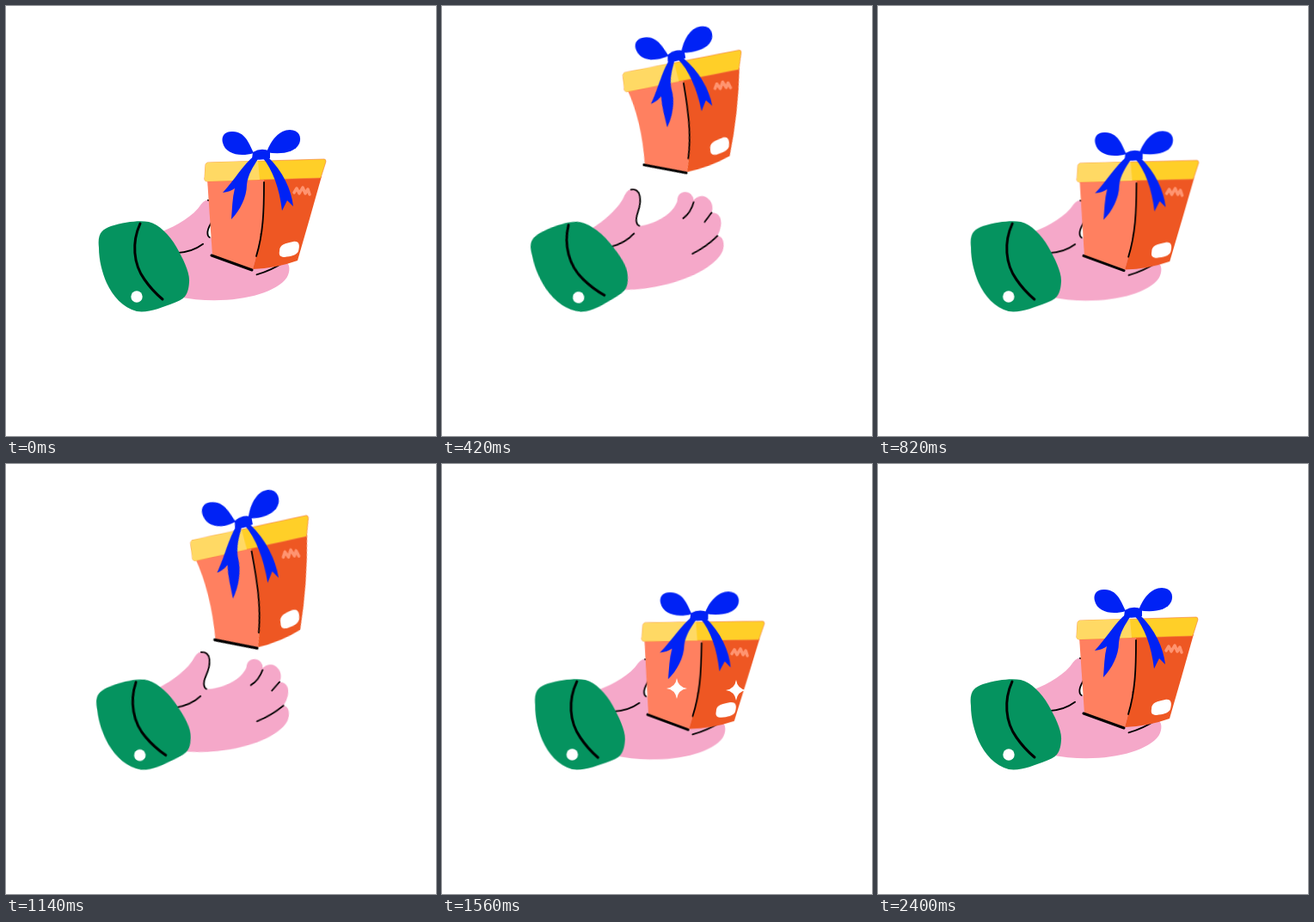
An HTML page without scripts that plays this animation: 500 px wide and 500 px high, repeating every 2420 ms.

```html
<!DOCTYPE html>
<html lang="en">
<head>
<meta charset="utf-8">
<title>Gift toss</title>
<style>
  html, body { margin: 0; width: 100%; height: 100%; overflow: hidden; background: #fff; }
  svg { display: block; width: 100%; height: 100%; }

  .arm, .box, .tail, .face, .spark {
    animation: 2420ms cubic-bezier(.33, 0, .67, 1) infinite;
  }
  .arm { transform-origin: 160px 302px; animation-name: swing; }
  .box, .tail { transform-origin: 295px 173px; }
  .box { animation-name: toss; }
  .tail { animation-name: sway; }
  .tail.left { --sway: -8deg; }
  .tail.right { --sway: 5deg; }
  .face.left { animation-name: bend-left; }
  .face.right { animation-name: bend-right; }

  .line { fill: none; stroke: #000; stroke-width: 1.8; stroke-linecap: round; }
  .thick { stroke-width: 3; }
  .skin { fill: #f5a8c9; }
  .ribbon { fill: #0022f5; }

  /* Two equal 800 ms tosses, then a rest */
  @keyframes swing {
    0%, 33.06%, 66.12%, 100% { transform: rotate(0deg); }
    9.09%, 23.97%, 42.15%, 57.02% { transform: rotate(11deg); }
    16.53%, 49.59% { transform: rotate(-11.4deg); }
  }
  @keyframes toss {
    0%, 33.06%, 66.12%, 100% { transform: translate(0, 0) rotate(0deg) scale(1, 1); }
    9.09%, 42.15% {
      transform: translate(28px, 42px) rotate(11deg) scale(1.1, .88);
      animation-timing-function: cubic-bezier(.4, .1, .7, .9);
    }
    14.05%, 47.11% {
      transform: translate(-20.5px, -104px) rotate(-10.5deg) scale(1, 1.1);
      animation-timing-function: cubic-bezier(.2, .5, .6, 1);
    }
    15.7%, 48.76% {
      transform: translate(-24px, -122px) rotate(-10deg) scale(1, 1.05);
      animation-timing-function: cubic-bezier(.4, 0, .7, .6);
    }
    17.36%, 50.41% {
      transform: translate(-24.5px, -115px) rotate(-9.5deg) scale(1, 1.015);
      animation-timing-function: cubic-bezier(.35, .2, .7, .9);
    }
    23.97%, 57.02% { transform: translate(28px, 42px) rotate(11deg) scale(1.1, .88); }
  }
  @keyframes sway {
    0%, 9.09%, 23.97%, 42.15%, 57.02%, 100% { transform: rotate(0deg); }
    14.05%, 47.11% { transform: rotate(calc(var(--sway) + 3deg)); }
    17.36%, 50.41% { transform: rotate(var(--sway)); }
  }
  @keyframes bend-left {
    0%, 9.09%, 23.97%, 42.15%, 57.02%, 100% { d: path("M234 201Q237 247 240 290L287 306Q300 262 300 200Z"); }
    14.05%, 17.36%, 47.11%, 50.41% { d: path("M234 201Q245 240 240 290L287 306Q302 262 300 200Z"); }
  }
  @keyframes bend-right {
    0%, 9.09%, 23.97%, 42.15%, 57.02%, 100% { d: path("M300 200L367 198Q353 248 339 296Q314 305 287 306Q300 262 300 200Z"); }
    14.05%, 17.36%, 47.11%, 50.41% { d: path("M300 200L367 198Q357 250 339 296Q314 305 287 306Q302 262 300 200Z"); }
  }

  .spark { fill: #fff; transform: scale(0); }
  .first { animation-name: twinkle-first; }
  .second { animation-name: twinkle-second; }
  .third { animation-name: twinkle-third; }
  @keyframes twinkle-first {
    0%, 58%, 73.5%, 100% { transform: scale(0); }
    64%, 67% { transform: scale(1); }
  }
  @keyframes twinkle-second {
    0%, 74%, 87%, 100% { transform: scale(0); }
    80.5% { transform: scale(1); }
  }
  @keyframes twinkle-third {
    0%, 83.5%, 99%, 100% { transform: scale(0); }
    89.3% { transform: scale(1); }
  }
</style>
</head>
<body>
<svg viewBox="0 0 500 500">
  <defs>
    <path id="star" d="M0-12Q1.5-1.5 12 0Q1.5 1.5 0 12Q-1.5 1.5-12 0Q-1.5-1.5 0-12Z"/>
  </defs>

  <g class="arm">
    <g transform="rotate(11 160 302)">
      <path class="skin" d="M172 260C190 248 206 234 212 219C216 212 221 211 226 213C232 218 231 231 227 241C224 249 226 256 232 255C250 251 268 241 273 226C273 215 283 213 289 218Q292 221 292 225C297 219 305 218 310 224C314 228 315 234 313 239C322 239 325 246 324 254Q323 261 320 266C327 266 329 276 326 284C315 308 262 330 205 330Z"/>
      <g class="line">
        <path d="M219 213C231 211 232 226 227 240C224 249 226 254 229 255"/>
        <path d="M292 227Q289 239 280 246M313 239L305 250M320 266Q307 279 291 287M195 280Q212 276 223 264"/>
      </g>
    </g>
    <path fill="#05935f" d="M108 281C106 264 112 260 122 256C138 251 155 249 166 251C178 254 190 266 198 280C206 294 214 310 213 321C212 338 206 341 196 345C180 351 166 357 152 355C136 351 124 337 117 322C112 310 108 296 108 281Z"/>
    <path class="line thick" d="M156 253C146 275 148 300 161 318Q170 331 182 341"/>
    <circle cx="152" cy="338" r="6.7" fill="#fff"/>
  </g>

  <g class="box">
    <path class="face left" fill="#ff8060" d="M234 201Q237 247 240 290L287 306Q300 262 300 200Z"/>
    <path class="face right" fill="#ee5723" d="M300 200L367 198Q353 248 339 296Q314 305 287 306Q300 262 300 200Z"/>
    <path class="line" d="M300 205C300 240 299 265 291 291"/>
    <path class="line thick" d="M239 290L286 307"/>
    <path fill="none" stroke="#ff9470" stroke-width="3.5" stroke-linejoin="round" stroke-linecap="round" d="M335 217L338 212L341 218L345 211L348 218L351 213L353 219"/>
    <path fill="#fff" d="M318 285C318 277 325 276 334 274C341 273 342 278 340 285C338 290 331 291 324 292C319 292 317 290 318 285Z"/>

    <path fill="#ffcf28" stroke="#f47a3c" stroke-width=".6" d="M234 182L370 178Q372 178 372 181L366 200L233 204Q230 203 231 199L232 184Z"/>
    <path fill="#ffd964" d="M234 182L293 180L295 202L233 204Q230 203 231 199L232 184Z"/>

    <g class="ribbon">
      <path class="tail left" d="M289 174C276 184 266 202 252 217Q261 216 266 212C263 224 263 236 262 248C272 238 280 222 280 208C281 196 288 186 293 178Z"/>
      <path class="tail right" d="M298 176C310 190 318 212 321 238L327 226L334 233C332 214 322 192 304 175Z"/>
      <path d="M288 171C282 158 278 147 264 146C254 145 250 152 252 159C255 172 272 176 288 171Z"/>
      <path d="M303 170C308 156 318 144 330 144C341 144 344 153 341 160C336 171 318 173 303 170Z"/>
      <path d="M287 170Q297 164 307 169L307 177Q297 180 286 178Z"/>
    </g>
  </g>

  <g transform="translate(273 261)"><use class="spark first" href="#star"/></g>
  <g transform="translate(342 263)"><use class="spark first" href="#star"/></g>
  <g transform="translate(337 200)"><use class="spark second" href="#star"/></g>
  <g transform="translate(257 236)"><use class="spark third" href="#star"/></g>
  <g transform="translate(331 185)"><use class="spark third" href="#star"/></g>
</svg>
</body>
</html>
```
